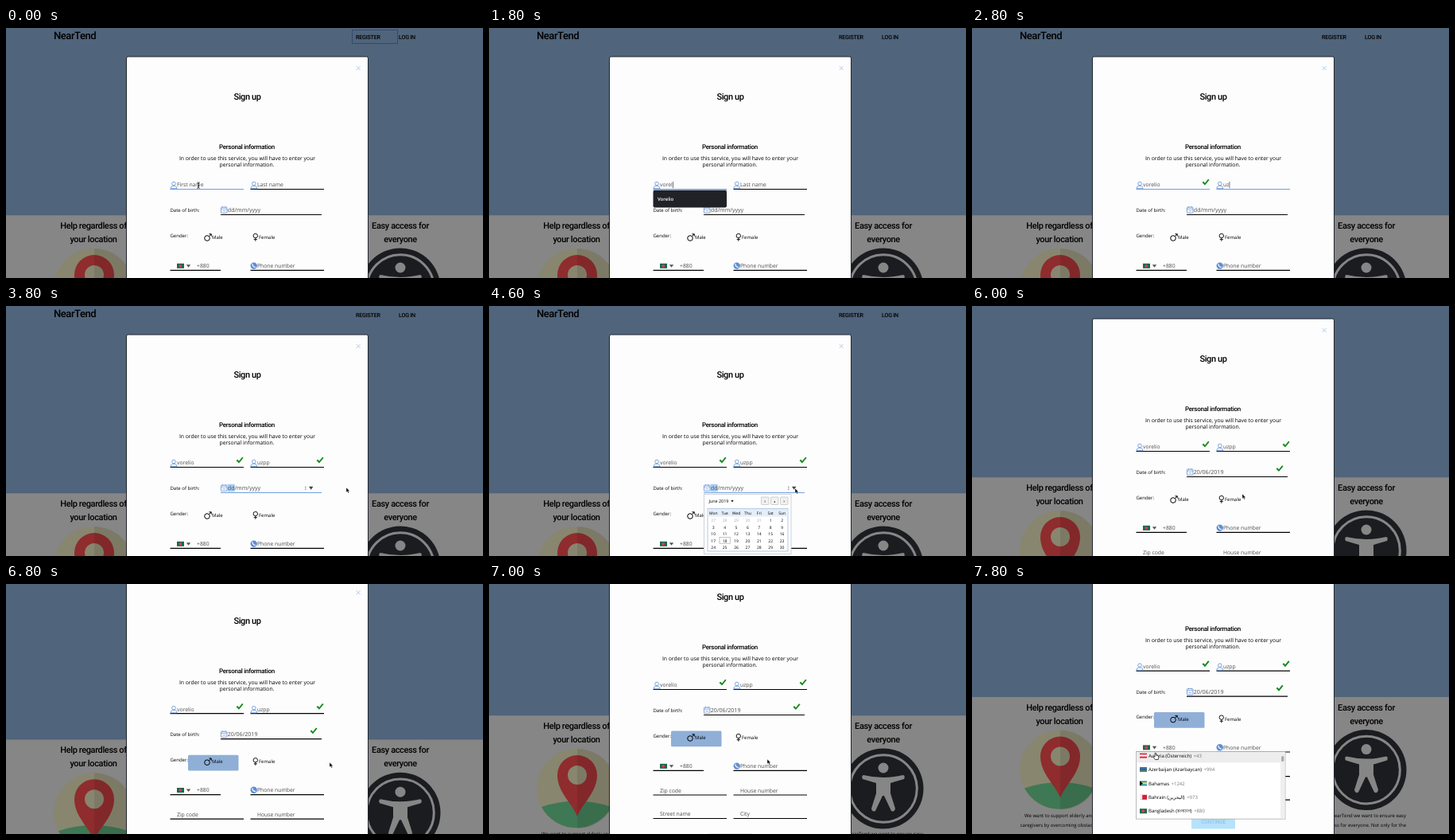
Write an HTML page that moves like this. It is 600 by 314 pixels and loops after 8000 ms.

```html
<!DOCTYPE html>
<html lang="en">
<head>
<meta charset="utf-8">
<title>Sign up form</title>
<style>
  html, body { margin: 0; width: 100%; height: 100%; overflow: hidden; background: #868686; }
  svg { display: block; width: 100vw; height: 100vh; }
  text { font: 6.8px "Open Sans", "Noto Sans", sans-serif; text-rendering: geometricPrecision; white-space: pre; }
  .head { font-family: Roboto, sans-serif; font-weight: 500; letter-spacing: -.034em; }
  .brand { font-size: 13px; }
  .nav { font-size: 7.2px; }
  .big { font-size: 11px; }
  .mid { font-size: 8px; }
  .small { font-size: 6px; }
  .date { font-size: 7.1px; }
  .tiny { font-size: 5px; }
  .input { fill: #4c4c4c; }
  .center { text-anchor: middle; }
  .end { text-anchor: end; }
</style>
</head>
<body>
<svg id="stage" viewBox="0 0 600 314" preserveAspectRatio="none"></svg>
<script>
const LOOP = 8000, TICK = 200;
const BLUE = '#6f9fe0', INK = '#000', GRAY = '#868686';

const add = (parent, tag, attrs = {}, content) => {
  const node = document.createElementNS('http://www.w3.org/2000/svg', tag);
  for (const key in attrs) node.setAttribute(key, attrs[key]);
  if (content !== undefined) node.textContent = content;
  parent.append(node);
  return node;
};
const group = (parent, x = 0, y = 0) => add(parent, 'g', { transform: `translate(${x} ${y})` });
const rect = (parent, x, y, width, height, fill, more) =>
  add(parent, 'rect', { x, y, width, height, fill, ...more });
const circle = (parent, cx, cy, r, fill, more) => add(parent, 'circle', { cx, cy, r, fill, ...more });
const path = (parent, d, fill, more) => add(parent, 'path', { d, fill, ...more });
const stroke = (parent, d, color, width, more) =>
  path(parent, d, 'none', { stroke: color, 'stroke-width': width, ...more });
const text = (parent, x, y, content, style = '', fill = INK) =>
  add(parent, 'text', { x, y, class: style, fill }, content);
const show = (node, on) => node.setAttribute('visibility', on ? 'visible' : 'hidden');

const stage = document.getElementById('stage');
const page = group(stage);

// Dimmed page behind the dialog
rect(page, 0, 0, 600, 235.5, '#50647b');
rect(page, 0, 235.5, 600, 300, GRAY);
text(page, 60, 14, 'NearTend', 'head brand');
text(page, 440, 14, 'REGISTER', 'head nav');
text(page, 494, 14, 'LOG IN', 'head nav');
const navFocus = rect(page, 435.5, 2.5, 57, 17, 'none',
  { stroke: '#15305c', 'stroke-width': 1, 'stroke-dasharray': '1 1' });

text(page, 110, 252, 'Help regardless of', 'head big center');
text(page, 110, 269, 'your location', 'head big center');
text(page, 496, 252, 'Easy access for', 'head big center');
text(page, 496, 269, 'everyone', 'head big center');

const map = group(page, 110, 327);
circle(map, 0, 0, 50, '#88866f');
path(map, 'M-44 23 Q0 8 44 23 A50 50 0 0 1 -44 23Z', '#3f7854');
path(map, 'M1 35 C-4 20 -24 5 -24 -17 A25 25 0 0 1 26 -17 C26 5 6 20 1 35Z', '#8f2c2e');
circle(map, 1, -17, 12, '#88866f');
path(map, 'M1 -50A50 50 0 0 1 1 50Z', '#000', { opacity: .09 });

const access = group(page, 496, 327);
circle(access, 0, 0, 50.5, '#1b1c1f');
circle(access, 0, 0, 42.3, 'none', { stroke: GRAY, 'stroke-width': 3 });
circle(access, 0, -26, 6.5, GRAY);
path(access, 'M-25 -17 Q0 -11 25 -17 Q28 -16 26 -12 L9 -7 L9 6 L15 25 Q14 30 10 28 L1 9 H-1 L-10 28 Q-14 30 -15 25 L-9 6 V-7 L-26 -12 Q-28 -16 -25 -17Z', GRAY);

text(page, 110, 386, 'We want to support elderly and', 'small center');
text(page, 110, 398.5, 'caregivers by overcoming obstacles', 'small center');
text(page, 546, 386, 'At NearTend we want to ensure easy', 'small end');
text(page, 546, 398.5, 'equal access for everyone. Not only for the', 'small end');

// Dialog
rect(page, 151.5, 36, 304, 480, '#fdfdfd', { rx: 2, stroke: '#22272e', 'stroke-width': 1 });
stroke(page, 'M440.7 48l5 5m0 -5l-5 5', '#a9c5ea', .9);
text(page, 303.5, 90, 'Sign up', 'head big center');
text(page, 303, 152.3, 'Personal information', 'head mid center');
text(page, 303.5, 166, 'In order to use this service, you will have to enter your', 'center');
text(page, 303, 174, 'personal information.', 'center');

const underline = (x1, x2, y) => stroke(page, `M${x1} ${y}H${x2}`, INK, 1.2);
const tick = (x, y) => path(page, `M${x - 4.5} ${y + .5}l1.8 -1.3 1.7 2 4 -5 1.6 1.1 -5.6 6.8z`, '#128a1c');
const personIcon = (x, y) => {
  const icon = group(page, x, y);
  const line = { stroke: '#5f8fd3', 'stroke-width': .8 };
  circle(icon, 0, -2, 2.3, 'none', line);
  path(icon, 'M-4 4.2Q-4 1.4 -1.3 .8H1.3Q4 1.4 4 4.2Z', 'none', line);
};
const field = (x1, x2, baseline, lineY, textX, placeholder, style = '') => ({
  line: underline(x1, x2, lineY),
  label: text(page, textX, baseline, placeholder, 'input ' + style),
  placeholder
});

const dateHighlight = rect(page, 278.7, 223.7, 9, 9.6, '#a9cdf5');
const fields = {
  first: field(206.5, 299, 199.4, 202.5, 215, 'First name'),
  last: field(307.5, 400, 199.4, 202.5, 316, 'Last name'),
  date: field(270, 397, 231, 234.5, 278.8, 'dd/mm/yyyy', 'date')
};
fields.first.tick = tick(294, 193.5);
fields.last.tick = tick(395, 193.5);
fields.date.tick = tick(387, 224);
personIcon(211, 197.5);
personIcon(311.8, 197.5);

text(page, 206.5, 231, 'Date of birth:', 'small');
rect(page, 270.5, 225, 7.4, 7.4, 'none', { stroke: '#5f8fd3', 'stroke-width': .8, rx: .6 });
stroke(page, 'M270.5 227.2h7.4M272.5 224v2M276 224v2M272.4 229.8h3.8', '#5f8fd3', .7);

text(page, 206.5, 262.8, 'Gender:', 'small');
const maleBox = rect(page, 229, 254.5, 63.5, 19.7, '#8fafd7', { rx: 1.5 });
circle(page, 253, 264, 3.3, 'none', { stroke: INK, 'stroke-width': 1 });
stroke(page, 'M255.4 261.6l2.8 -2.8M255.4 258.8h2.8v2.8', INK, 1);
text(page, 259, 265.3, 'Male', 'small');
circle(page, 313.8, 261, 2.7, 'none', { stroke: INK, 'stroke-width': .9 });
stroke(page, 'M313.8 263.7v4M311.7 265.6h4.2', INK, .9);
text(page, 318, 265.3, 'Female', 'small');

const flags = {
  stripes: (g, a, b, c) => [a, b, c].forEach((color, i) => rect(g, 0, i * 2, 9, 2, color)),
  austria: g => flags.stripes(g, '#d8283c', '#fff', '#d8283c'),
  azerbaijan: g => flags.stripes(g, '#2478b4', '#7a4a72', '#3f8a6a'),
  bahamas: g => {
    flags.stripes(g, '#2295a5', '#f0cf45', '#2295a5');
    path(g, 'M0 0L4 3 0 6z', INK);
  },
  bahrain: g => {
    rect(g, 0, 0, 9, 6, '#d1203a');
    path(g, 'M0 0H2.5l1.2 1-1.2 1 1.2 1-1.2 1 1.2 1-1.2 1H0z', '#f4f4f4');
  },
  bangladesh: g => {
    rect(g, 0, 0, 9, 6, '#14694f');
    circle(g, 4.2, 3, 1.9, '#e53a44');
  }
};
flags.bangladesh(group(page, 215, 295.8));
path(page, 'M226.8 297.2h5.4l-2.7 3.6z', '#555');
text(page, 240, 301, '+880', 'input');
underline(206.5, 270, 304.4);
circle(page, 311.7, 298.6, 4.2, '#5f8fd3');
stroke(page, 'M310 296.7q.2 3.2 3.5 3.8', '#fff', 1.2, { 'stroke-linecap': 'round' });
field(307.5, 400, 301, 304.4, 316, 'Phone number');
field(206.5, 299, 331.6, 335, 215, 'Zip code');
field(307.5, 400, 331.6, 335, 316, 'House number');
field(206.5, 299, 361, 364.5, 215, 'Street name');
field(307.5, 400, 361, 364.5, 316, 'City');
rect(page, 276, 383.5, 55, 17.5, '#b6e2fb', { rx: 1 });
text(page, 303.5, 394.8, 'CONTINUE', 'head center', '#93c3e4').setAttribute('font-style', 'italic');

// Autofill suggestion
const suggestion = group(page);
rect(suggestion, 206.5, 203.8, 92.5, 21.6, '#202227', { rx: 2 });
rect(suggestion, 206.5, 202.6, 92.5, 1, BLUE);
text(suggestion, 212, 216.6, 'Vorelio', 'small', '#fff').style.fontWeight = 600;

// Date picker
const dateControls = group(page);
path(dateControls, 'M375.6 228l1.2 -1.6 1.2 1.6zM375.6 229.6l1.2 1.6 1.2 -1.6z', '#888');
path(dateControls, 'M381 226.8h5.4l-2.7 4z', '#444');
const calendar = group(page, 270, 236);
rect(calendar, .5, .5, 109.5, 75, '#fff', { stroke: '#c2c6cc', 'stroke-width': .8 });
text(calendar, 6.5, 11, 'June 2019', 'tiny').style.fontSize = '5.4px';
path(calendar, 'M34.3 8h3.4l-1.7 2.3z', INK);
['‹', '●', '›'].forEach((mark, i) => {
  rect(calendar, 72.5 + i * 12, 4, 9.5, 9.5, '#f1f1f1', { stroke: '#b5b5b5', 'stroke-width': .6, rx: .8 });
  text(calendar, 77.2 + i * 12, 10.5, mark, 'tiny center').style.fontSize = i === 1 ? '3.5px' : '6px';
});
rect(calendar, 5, 18.5, 101, 53.5, '#fff', { stroke: '#9dbbe0', 'stroke-width': .8 });
rect(calendar, 5.4, 18.9, 100.2, 9.6, '#e4edf8');
const column = i => 12.2 + i * 14.4;
['Mon', 'Tue', 'Wed', 'Thu', 'Fri', 'Sat', 'Sun'].forEach((day, i) =>
  text(calendar, column(i), 25.8, day, 'tiny center'));
for (let i = 0; i < 35; i++) {
  const day = i < 5 ? 27 + i : i - 4;
  const row = Math.floor(i / 7);
  text(calendar, column(i % 7), 35 + row * 8.5, day, 'tiny center', i < 5 ? '#aaa' : INK);
}
rect(calendar, column(1) - 6.6, 54.6, 13.2, 7.6, 'none', { stroke: '#999', 'stroke-width': .6 });

// Country list
const countries = group(page, 206.5, 304);
rect(countries, 0, 0, 187.5, 84.5, '#fff', { stroke: '#aaa', 'stroke-width': .8 });
const hovered = rect(countries, .4, .4, 181, 13.4, '#ededed');
[
  ['austria', 'Austria (Österreich)', '+43'],
  ['azerbaijan', 'Azerbaijan (Azərbaycan)', '+994'],
  ['bahamas', 'Bahamas', '+1242'],
  ['bahrain', 'Bahrain (\u2067البحرين\u2069)', '+973'],
  ['bangladesh', 'Bangladesh (বাংলাদেশ)', '+880']
].forEach(([flag, name, code], i) => {
  const y = 5 + i * 17.4;
  flags[flag](group(countries, 4.5, y - 3));
  const label = text(countries, 15.5, y + 2.2, '', 'small');
  add(label, 'tspan', {}, name);
  add(label, 'tspan', { fill: '#777', dx: 2.5 }, code);
});
rect(countries, 181.5, .5, 5.5, 83.5, '#efefef');
rect(countries, 182.5, 5.5, 3.4, 7, '#adadad', { rx: 1.5 });

const caret = rect(page, 0, 193, .6, 8.2, '#222');

const cursors = { beam: group(stage), arrow: group(stage), hand: group(stage) };
stroke(cursors.beam, 'M-1.6 -3.6Q0 -3.6 0 -2.4Q0 -3.6 1.6 -3.6M0 -2.6V2.8M-1.6 3.8Q0 3.8 0 2.6Q0 3.8 1.6 3.8M-1 .9H1', INK, .8);
path(cursors.arrow, 'M0 0V6l1.4-1.2 1 2.3 1.1-.5-1-2.2H4.3z', INK, { stroke: '#fff', 'stroke-width': .4 });
path(cursors.hand, 'M-1 -4Q0 -5 .6 -4V-1.4L3 -.8Q4 -.4 3.8 1L3.2 4H-.6L-3 .8Q-3 -.4 -1.8 0L-1 .8z', '#fff',
  { stroke: INK, 'stroke-width': .7 });

// Each step overrides part of the state from its time onward
const steps = [
  [0, { first: '', last: '', date: '', blue: ['first'], done: [], scroll: 0, nav: true, cursor: ['beam', 242, 197.5] }],
  [400, { nav: false, caret: 'first' }],
  [1000, { first: 'v', suggest: true, cursor: null }],
  [1200, { first: 'vo' }],
  [1400, { first: 'vor' }],
  [1600, { first: 'vore' }],
  [1800, { first: 'vorel' }],
  [2000, { first: 'voreli' }],
  [2200, { first: 'vorelio' }],
  [2400, { suggest: false, caret: 'last', done: ['first'], blue: ['first', 'last'] }],
  [2600, { last: 'u' }],
  [2800, { last: 'uz' }],
  [3000, { last: 'uzp', blue: ['last'] }],
  [3200, { last: 'uzpp' }],
  [3400, { caret: null, done: ['first', 'last'], blue: ['last', 'date'], picking: true }],
  [3600, { cursor: ['arrow', 459, 227], blue: ['date'] }],
  [3800, { cursor: ['arrow', 428, 228] }],
  [4000, { cursor: ['arrow', 396, 229] }],
  [4200, { cursor: ['arrow', 385, 229] }],
  [4400, { calendar: true }],
  [4800, { cursor: ['arrow', 362, 262] }],
  [5000, { cursor: ['arrow', 327, 293] }],
  [5400, { calendar: false, picking: false, date: '20/06/2019', done: ['first', 'last', 'date'], blue: [] }],
  [5600, { cursor: ['arrow', 366, 266] }],
  [5800, { cursor: ['arrow', 388, 248.5] }],
  [6000, { scroll: 20, cursor: ['arrow', 340, 236] }],
  [6200, { scroll: 39.8, cursor: ['hand', 268, 226] }],
  [6400, { male: true }],
  [6600, { cursor: ['arrow', 352, 226] }],
  [6800, { cursor: ['arrow', 407, 224] }],
  [7000, { scroll: 70, cursor: ['arrow', 350, 220] }],
  [7200, { scroll: 93.4, cursor: ['hand', 231, 208] }],
  [7400, { countries: true }],
  [7600, { hovering: true, cursor: ['hand', 231, 216.5] }]
];

function render(time) {
  const state = Object.assign({}, ...steps.filter(([start]) => start <= time).map(step => step[1]));
  page.setAttribute('transform', `translate(0 ${-state.scroll})`);

  for (const name in fields) {
    const { label, line, tick: mark, placeholder } = fields[name];
    const focused = state.blue.includes(name);
    label.textContent = state[name] || placeholder;
    line.setAttribute('stroke', focused ? BLUE : INK);
    line.setAttribute('stroke-width', focused ? 1 : 1.2);
    show(mark, state.done.includes(name));
  }
  show(caret, state.caret);
  if (state.caret) {
    const { label } = fields[state.caret];
    const width = state[state.caret] ? label.getComputedTextLength() : 0;
    caret.setAttribute('x', +label.getAttribute('x') + width + .3);
  }

  show(navFocus, state.nav);
  show(suggestion, state.suggest);
  show(dateHighlight, state.picking);
  show(dateControls, state.picking);
  show(calendar, state.calendar);
  show(maleBox, state.male);
  show(countries, state.countries);
  show(hovered, state.hovering);

  const [kind, x, y] = state.cursor || [];
  for (const name in cursors) show(cursors[name], name === kind);
  if (kind) cursors[kind].setAttribute('transform', `translate(${x} ${y})`);
}

const origin = performance.now();
let shown = -1;
function frame() {
  const elapsed = (performance.now() - origin) % LOOP;
  const now = Math.floor(elapsed / TICK) * TICK;
  if (now !== shown) render(shown = now);
  requestAnimationFrame(frame);
}
frame();
</script>
</body>
</html>
```
